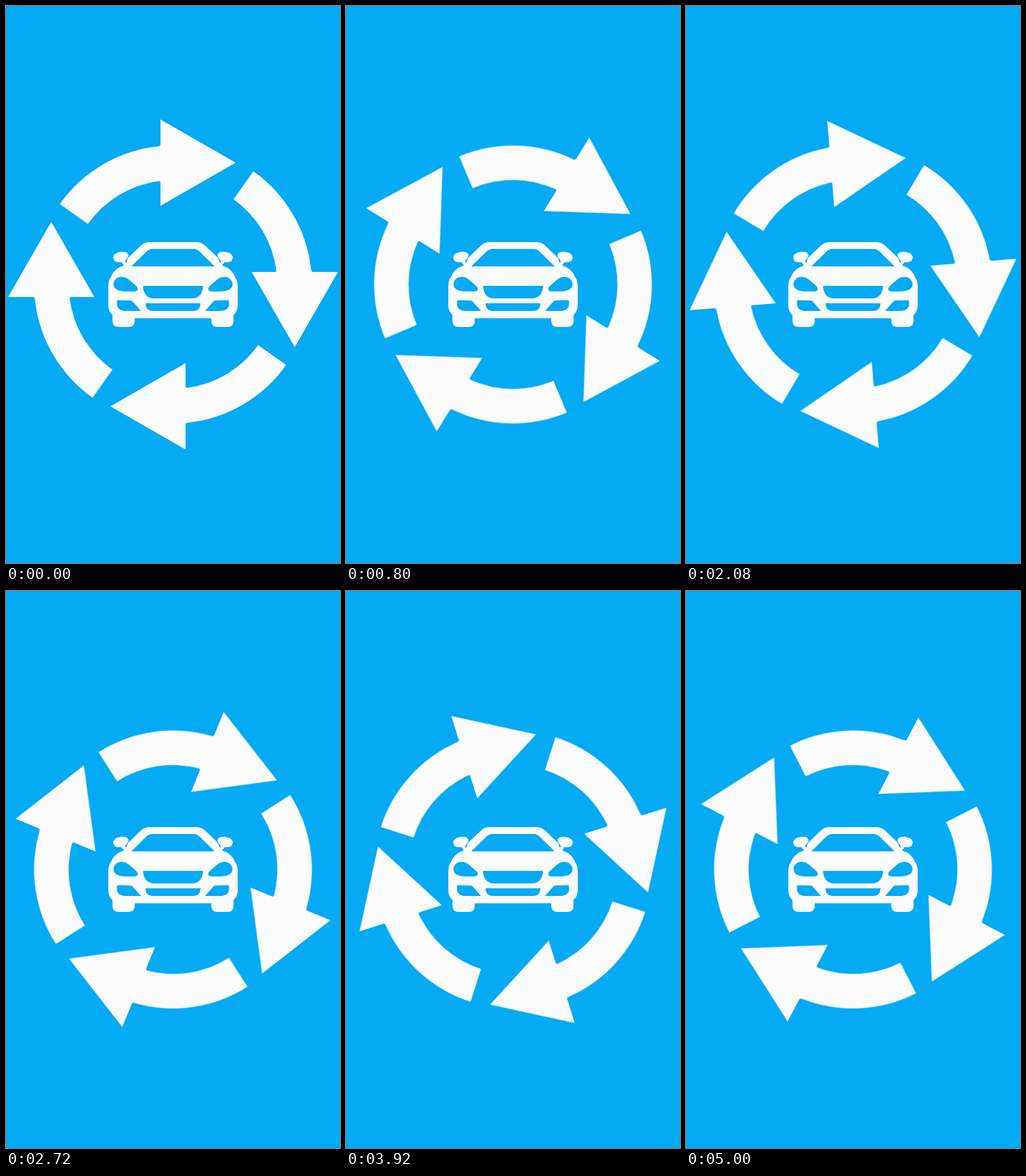
Write an HTML page that moves like this. It is 480 px wide and 800 px high and loops after 5.04 s.

```html
<!DOCTYPE html>
<html lang="en">
<head>
<meta charset="utf-8">
<title>Car cycle</title>
<style>
  :root { --sky: #04aaf4; --paper: #fbfbfb; }
  html, body { margin: 0; width: 100%; height: 100%; overflow: hidden; background: var(--sky); }
  svg { display: block; width: 100%; height: 100%; fill: var(--paper); }
  .hole { fill: var(--sky); }

  /* Rests for 80 ms, then turns 360/215 degrees every 40 ms. */
  #ring { transform-origin: 0 0; animation: turn 5040ms -1ms infinite; }
  @keyframes turn {
    0% { transform: rotate(0deg); animation-timing-function: step-end; }
    1.587302% { transform: rotate(0deg); animation-timing-function: steps(124, start); }
    100% { transform: rotate(207.628deg); }
  }
</style>
</head>
<body>
<svg viewBox="0 0 480 800">
  <defs>
    <path id="arrow" d="M-162.6-115.6A199.5 199.5 0 0 1-21-198.4Q-18-198.9-18-201.5V-237L90-175L-18-113V-146.5Q-18-149-21-148.5A150 150 0 0 0-122.3-86.9Z"/>
    <g id="side">
      <!-- mirror -->
      <path d="M154 361C155 355 162 353 168 353C173 353 176 355 176 359C175 362 172 364 171 367L177 372L172 376L166 368C160 368 156 368 155 364Z"/>
      <!-- wheel -->
      <path d="M153 438V452Q153 461 162 461H176Q185 461 185 452V444Z"/>
      <!-- headlight -->
      <path class="hole" d="M154.500 399C155 393 160 389 166 389C171 389 175 391 179 395L188 403C191 407 189 410 184 410H172C161 410 154 406 154.500 399Z"/>
      <!-- fog light -->
      <path class="hole" d="M159.500 424Q159.500 422.500 161 422.500L179 423Q181 423 182.500 425L194 438H170C163 437 159 433 159.500 428Z"/>
    </g>
  </defs>

  <g transform="translate(240 400)">
    <g id="ring">
      <use href="#arrow"/>
      <use href="#arrow" transform="rotate(90)"/>
      <use href="#arrow" transform="rotate(180)"/>
      <use href="#arrow" transform="rotate(270)"/>
    </g>
  </g>

  <!-- body and roof -->
  <path d="M207 339H273Q281 339 286 344L305 362L308 372C320 375 326 381 329 389Q333 394 333 402V430Q333 438 327 444V448.500H153V444Q147 438 147 430V402Q147 394 151 389C154 381 160 375 172 372L175 362L194 344Q199 339 207 339Z"/>
  <path class="hole" d="M180 374L202 352.500Q205.500 349 210 349H270Q274.500 349 278 352.500L300 374Z"/>
  <path class="hole" d="M197 402H283C283 412 278 420 267 420H213C202 420 197 412 197 402Z"/>
  <path class="hole" d="M200.500 427H279.500Q279 438 269 438H211Q201 438 200.500 427Z"/>
  <use href="#side"/>
  <use href="#side" transform="matrix(-1 0 0 1 480 0)"/>
</svg>
</body>
</html>
```
